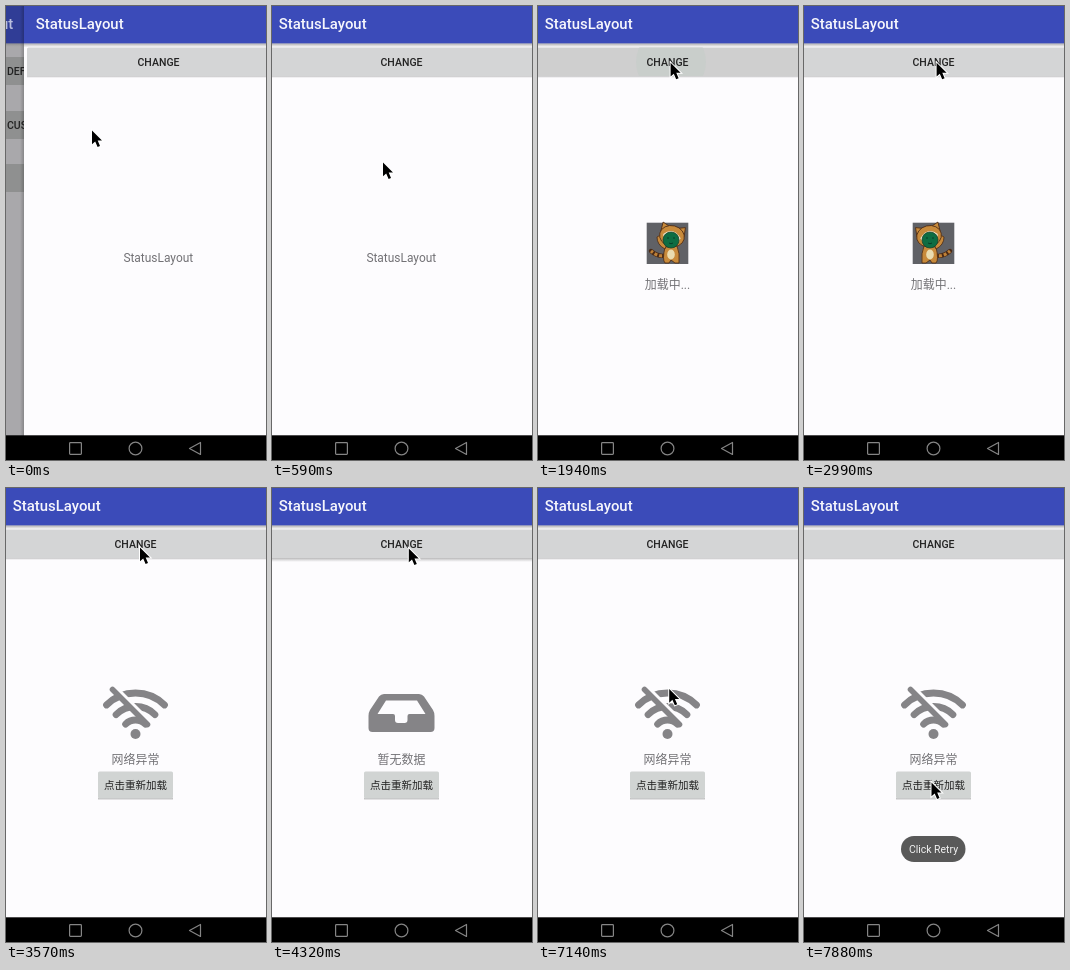
An HTML page that plays this animation: 260x454 px, repeating every 8 s.

```html
<!DOCTYPE html>
<html lang="zh">
<head>
<meta charset="utf-8">
<title>StatusLayout</title>
<style>
html, body { margin: 0; width: 100%; height: 100%; overflow: hidden; background: #fdfcfe; }
svg { display: block; width: 100%; height: 100%; }
text { font-family: Roboto, "Noto Sans CJK SC", "Noto Sans CJK", sans-serif; text-anchor: middle; }
.title { font-size: 14.9px; font-weight: 500; fill: #f6f6fc; text-anchor: start; }
.label { font-size: 11.94px; fill: #727175; }
.button { font-size: 10.5px; font-weight: 500; fill: #222; }
</style>
</head>
<body>
<svg viewBox="0 0 260 454">
  <defs>
    <linearGradient id="drop" x2="0" y2="1">
      <stop stop-color="#777" stop-opacity=".6"/>
      <stop offset="1" stop-color="#999" stop-opacity="0"/>
    </linearGradient>
    <linearGradient id="edge">
      <stop stop-color="#000" stop-opacity="0"/>
      <stop offset="1" stop-color="#000" stop-opacity=".2"/>
    </linearGradient>
    <clipPath id="bar"><rect x="-2" y="41.500" width="264" height="28.500"/></clipPath>
  </defs>

  <g id="previous">
    <rect width="30" height="430" fill="#a9a8ab"/>
    <rect width="30" height="37.500" fill="#303d96"/>
    <rect y="37.500" width="30" height="3.500" fill="url(#drop)"/>
    <g fill="#8f9090">
      <rect y="51" width="30" height="28"/>
      <rect y="105" width="30" height="28"/>
      <rect y="158" width="30" height="28"/>
    </g>
    <text class="title" x="-6" y="22.5" fill-opacity=".7">ut</text>
    <text class="button" x="1" y="68.7" style="text-anchor:start">DEF</text>
    <text class="button" x="1" y="122.7" style="text-anchor:start">CUS</text>
  </g>

  <g id="page">
    <rect x="-9" width="4" height="430" fill="url(#edge)"/>
    <rect x="-5" width="270" height="430" fill="#fdfcfe"/>
    <rect x="-5" width="270" height="37.500" fill="#3b4bb9"/>
    <rect x="-5" y="37.500" width="270" height="4" fill="url(#drop)"/>
    <text class="title" x="6.800" y="22.600">StatusLayout</text>
    <rect id="changeShadow" x="-2" y="69.500" width="264" fill="url(#drop)"/>
    <rect id="change" x="-2" y="41.500" width="264" height="28.500" rx="1.5"/>
    <circle id="ripple" cx="133" cy="56" r="35" fill="#c9cecb" clip-path="url(#bar)"/>
    <text class="button" x="129.5" y="59.7">CHANGE</text>

    <g id="normal"><text class="label" x="129.3" y="256.2">StatusLayout</text></g>

    <g id="loading">
      <rect x="108.700" y="216.700" width="41.600" height="41.300" fill="#606166"/>
      <g id="cat">
        <path d="M129 249Q121 252 113 245" fill="none" stroke="#4a2a16" stroke-width="4.4" stroke-linecap="round"/>
        <path d="M129 249Q121 252 113 245" fill="none" stroke="#bf8137" stroke-width="3.2" stroke-dasharray="3 2"/>
        <g fill="#c88a3b" stroke="#4a2a16" stroke-width=".8">
          <path d="M127 241Q124 254 127 257H131L133 254 137 257H141Q142 247 139 240Z"/>
          <path d="M127 243Q119 239 119 231Q122 228 124 231L129 238Z"/>
        </g>
        <ellipse cx="133" cy="248.500" rx="3.800" ry="5" fill="#eadcb0"/>
        <g transform="rotate(14 133 234)">
          <g fill="#c88a3b" stroke="#4a2a16" stroke-width=".8">
            <path d="M121 228L121 218.500 128 221ZM137 221L144 218.500 145 228Z"/>
            <ellipse cx="133" cy="230" rx="12.500" ry="10.500"/>
          </g>
          <path d="M124 230Q132 220 142 230L140 235H126Z" fill="#ede7cf"/>
        </g>
        <circle cx="133" cy="234" r="8" fill="#0d6d43" stroke="#153d2a" stroke-width=".7"/>
        <path d="M129 232h2m4 0h2m-6 5q2 1.500 4 0" fill="none" stroke="#073e26"/>
      </g>
      <text class="label" x="129.5" y="283">加载中...</text>
    </g>

    <g id="empty">
      <path fill="#858487" fill-rule="evenodd" d="M112 206H147Q150 206 152 208.500L161 222Q162.500 224.500 162.500 228V240Q162.500 244 158.500 244H100.500Q96.500 244 96.500 240V228Q96.500 224.500 98 222L107 208.500Q109 206 112 206ZM114 212.500L105.500 226H121Q123 226 123 228V232Q123 235 126 235H132.500Q135.500 235 135.500 232V228Q135.500 226 137.500 226H153.500L145 212.500Z"/>
      <text class="label" x="129.5" y="275.800">暂无数据</text>
    </g>

    <g id="error">
      <g id="waves" fill="none" stroke="#858487" stroke-width="6.800" stroke-linecap="round"></g>
      <circle cx="129.5" cy="246" r="5" fill="#858487"/>
      <path d="M109 199.500L145 235.500" stroke="#fdfcfe" stroke-width="5"/>
      <path d="M106.500 201.500L141.500 236.500" stroke="#858487" stroke-width="5.6" stroke-linecap="round"/>
      <text class="label" x="129.5" y="275.800">网络异常</text>
    </g>

    <g id="retry">
      <rect x="92" y="310" width="75" height="2.500" fill="url(#drop)"/>
      <rect id="retryFace" x="92" y="283.500" width="75" height="27" rx="1.5"/>
      <text class="button" x="129.5" y="300.900">点击重新加载</text>
    </g>
  </g>

  <g id="toast">
    <rect x="97" y="348" width="64.500" height="26" rx="13" fill="#595959"/>
    <text x="129.5" y="364.800" font-size="10.45" fill="#f2f2f2">Click Retry</text>
  </g>

  <rect y="429.300" width="260" height="25" fill="#000"/>
  <g fill="none" stroke="#858585" stroke-width="1.2">
    <rect x="63.600" y="436.600" width="11.800" height="11.800" rx=".8"/>
    <circle cx="129.5" cy="442.500" r="6.400"/>
    <path d="M183.500 442.500L194.500 436.500V448.500Z" stroke-linejoin="round"/>
  </g>

  <path id="cursor" d="M0 0V13.800L3.200 10.900 5.600 16.400 8 15.400 5.700 10H10Z" fill="#000" stroke="#fff" stroke-width="2" paint-order="stroke"/>
</svg>
<script>
const LOOP = 8000, TICK = 148.8;
const $ = id => document.getElementById(id);
const show = (id, on) => { $(id).style.display = on ? "" : "none"; };

// tick, x, y
const cursorPath = [
  [0, 86, 124.5], [2, 104, 146], [4, 111, 156.5], [6, 112, 152], [7, 112, 152],
  [10, 131, 62], [11, 132.6, 56.8], [23, 132.6, 56.8], [24, 134, 59.5], [25, 134, 59.5],
  [26, 136.8, 60.5], [45, 136.8, 60.5], [50, 127.5, 294.5], [53, 127.5, 294.5]
];
// tick at which each view opens
const views = [[0, "normal"], [12, "loading"], [21, "error"], [27, "empty"], [39, "error"]];
// first and last tick of the button's dark and raised states
const presses = [[11, 13], [21, 21], [27, 28], [39, 39]];
const lifts = [[21, 21], [27, 29], [39, 39]];

const within = (n, [from, to]) => n >= from && n <= to;

function cursorAt(n) {
  const k = cursorPath.findIndex(p => p[0] > n);
  if (k < 0) return cursorPath[cursorPath.length - 1].slice(1);
  const a = cursorPath[k - 1], b = cursorPath[k];
  const u = (n - a[0]) / (b[0] - a[0]);
  return [a[1] + (b[1] - a[1]) * u, a[2] + (b[2] - a[2]) * u];
}

for (const r of [41, 27.5, 14]) {
  const d = r * Math.SQRT1_2;
  const arc = document.createElementNS("http://www.w3.org/2000/svg", "path");
  arc.setAttribute("d", `M${129.5 - d} ${246 - d}A${r} ${r} 0 0 1 ${129.5 + d} ${246 - d}`);
  $("waves").append(arc);
}

function draw(ms) {
  const n = Math.floor((ms % LOOP + 12) / TICK);
  const shift = n < 3 ? 23 * Math.pow(0.3, n) : 0;
  $("page").setAttribute("transform", `translate(${shift})`);
  show("previous", n < 3);

  const view = views.filter(v => v[0] <= n).pop()[1];
  for (const id of ["normal", "loading", "empty", "error"]) show(id, id === view);
  show("retry", view === "empty" || view === "error");
  $("cat").setAttribute("transform", n % 2 ? "" : "matrix(-1 0 0 1 259 0)");

  const pressed = presses.some(p => within(n, p));
  const raised = lifts.some(p => within(n, p));
  $("change").setAttribute("fill", pressed ? "#cfcfcf" : "#d4d5d6");
  $("changeShadow").setAttribute("height", raised ? 4.5 : 2.5);
  show("ripple", within(n, [12, 13]));
  $("retryFace").setAttribute("fill", within(n, [50, 52]) ? "#c6c8c8" : "#d1d4d3");

  $("toast").setAttribute("opacity", n < 52 ? 0 : n < 53 ? 0.5 : 1);
  $("cursor").setAttribute("transform", `translate(${cursorAt(n)})`);
}

const start = performance.now();
function loop() {
  draw(performance.now() - start);
  requestAnimationFrame(loop);
}
loop();
</script>
</body>
</html>
```
